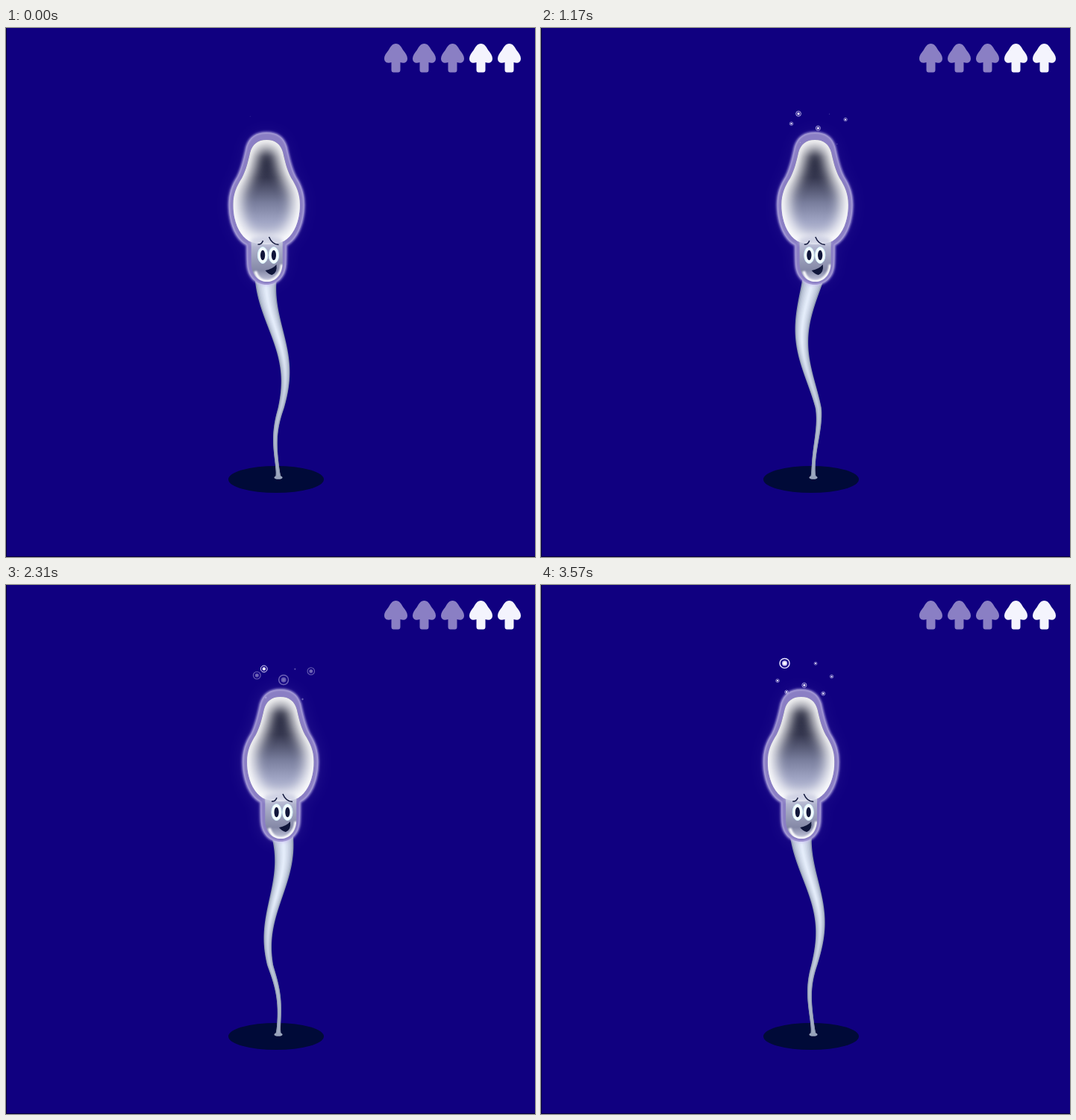
Recreate the animation shown at these times as an HTML page. Size 709 by 709 pixels, loop 3600 ms.

```html
<!DOCTYPE html>
<html>
<head>
<meta charset="utf-8">
<style>
  html, body { margin: 0; width: 100%; height: 100%; overflow: hidden; background: #100080; }
  svg { display: block; }
</style>
</head>
<body>
<svg width="709" height="709">
  <defs>
    <linearGradient id="shade" gradientUnits="userSpaceOnUse" x1="0" y1="150" x2="0" y2="290">
      <stop offset="0" stop-color="#4a4c62"/>
      <stop offset=".16" stop-color="#1f2138"/>
      <stop offset=".36" stop-color="#35374f"/>
      <stop offset=".6" stop-color="#787d9c"/>
      <stop offset=".78" stop-color="#a0a5c4"/>
      <stop offset="1" stop-color="#c8cbe0"/>
    </linearGradient>
    <linearGradient id="neckShade" gradientUnits="userSpaceOnUse" x1="0" y1="280" x2="0" y2="340">
      <stop offset="0" stop-color="#cbcee2"/>
      <stop offset=".3" stop-color="#aaadc8"/>
      <stop offset=".75" stop-color="#8488a6"/>
      <stop offset="1" stop-color="#c8cbe0"/>
    </linearGradient>
    <linearGradient id="tailShade" gradientUnits="userSpaceOnUse" x1="0" y1="420" x2="0" y2="602">
      <stop offset="0" stop-color="#74809c" stop-opacity="0"/>
      <stop offset="1" stop-color="#74809c" stop-opacity=".6"/>
    </linearGradient>
    <radialGradient id="core">
      <stop offset=".3" stop-color="#fff"/>
      <stop offset="1" stop-color="#a9a0e6"/>
    </radialGradient>
    <filter id="blur1" x="-20%" y="-20%" width="140%" height="140%"><feGaussianBlur stdDeviation=".8"/></filter>
    <filter id="blur3" x="-20%" y="-20%" width="140%" height="140%"><feGaussianBlur stdDeviation="2.5"/></filter>
    <filter id="blur8" x="-50%" y="-50%" width="200%" height="200%"><feGaussianBlur stdDeviation="8"/></filter>
    <filter id="blur10" x="-60%" y="-40%" width="220%" height="180%"><feGaussianBlur stdDeviation="10"/></filter>
    <path id="bell"/>
    <path id="neck" d="M-20.500 280V316C-20 332-10 340 0.500 340S21 332 21.500 316V280Z"/>
    <path id="halo"/>
    <clipPath id="inBell"><use href="#bell"/></clipPath>
    <clipPath id="inNeck"><use href="#neck"/></clipPath>
    <path id="mushroom" d="M0 21C5 21 7 25 10 30C13 34 15.500 37 15.500 41C15.500 46 11 48 6 46V56Q6 59.500 3 59.500H-3Q-6 59.500-6 56V46C-11 48-15.500 46-15.500 41C-15.500 37-13 34-10 30C-7 25-5 21 0 21Z"/>
  </defs>

  <path d="M.5 0V708.500H709" fill="none" stroke="#06003c"/>
  <g fill="#8a7fc4">
    <use href="#mushroom" x="522.500"/><use href="#mushroom" x="560.500"/><use href="#mushroom" x="598.500"/>
    <g fill="#f4f4fd"><use href="#mushroom" x="636.500"/><use href="#mushroom" x="674.500"/></g>
  </g>

  <ellipse cx="362" cy="605" rx="64" ry="18" fill="#000a38"/>
  <g id="tail"></g>
  <ellipse cx="365" cy="602.500" rx="5.500" ry="2.300" fill="#98a3bb"/>

  <g id="head">
    <use id="glow" href="#halo" fill="#e4dcff" stroke="#e4dcff" stroke-width="6" filter="url(#blur10)"/>
    <use href="#halo" fill="#b5a8ee" opacity=".6" filter="url(#blur3)"/>
    <use href="#halo" fill="#8a7ec4"/>
    <use id="ring" href="#halo" fill="none" stroke="#d6cff5" stroke-width="2.200" filter="url(#blur1)"/>
    <use href="#neck" fill="url(#neckShade)"/>
    <g clip-path="url(#inNeck)">
      <path d="M-15 326C-12 336-6 339.500 0.500 339.500S19 334 20.500 317" fill="none" stroke="#fff" stroke-width="3.500" filter="url(#blur1)"/>
    </g>
    <use href="#bell" fill="url(#shade)"/>
    <g clip-path="url(#inBell)" fill="none" stroke="#fff">
      <use href="#bell" stroke-width="23" opacity=".92" filter="url(#blur8)"/>
      <use href="#bell" stroke-width="5" opacity=".65" filter="url(#blur3)"/>
    </g>
    <path d="M-21 290V283Q0 274 21 283V290Z" fill="#c8cbe0" opacity=".8" filter="url(#blur3)"/>
  </g>

  <g id="face" fill="#10163a">
    <g fill="#f4fdff" stroke="#d3f0f8">
      <ellipse cx="-7.400" cy="304.500" rx="6.700" ry="11"/>
      <ellipse cx="7.400" cy="304.500" rx="6.700" ry="11"/>
    </g>
    <ellipse cx="-7.400" cy="304.500" rx="3.100" ry="6.700"/>
    <ellipse cx="7.400" cy="304.500" rx="3.100" ry="6.700"/>
    <path d="M-14 290Q-9 290.500-7 285M1 280Q5 290 14 290.500" fill="none" stroke="#10163a" stroke-width="1.500"/>
    <path d="M-4 325Q6 323 11 317Q12.500 328 5 331Q0 330-4 325Z"/>
  </g>
  <g id="bubbles"></g>
</svg>

<script>
const $ = id => document.getElementById(id);
const LOOP = 3600, SWAY = 900, TOP = 332, BASE = 602;

function add(parent, tag, attrs) {
  const el = document.createElementNS('http://www.w3.org/2000/svg', tag);
  for (const k in attrs) el.setAttribute(k, attrs[k]);
  return parent.appendChild(el);
}

// Right half as cubic points; the left half mirrors it.
function mirrored(half) {
  const back = half.slice(0, -1).reverse().map(([x, y]) => [-x, y]);
  const [start, ...rest] = half.concat(back);
  return `M${start}C${rest.join(' ')}Z`;
}
$('bell').setAttribute('d', mirrored([
  [0, 150], [12, 150], [19, 156], [22, 167], [25, 180], [27, 189], [33, 201],
  [40, 212], [44.7, 222], [44.7, 237], [44.7, 262], [34, 282], [20, 287], [13, 289], [6, 290], [0, 290]]));
$('halo').setAttribute('d', mirrored([
  [0, 140], [14, 140], [23, 146], [27, 159], [30, 173], [33, 187], [39, 199],
  [47, 211], [50.5, 222], [50.5, 237], [50.5, 262], [41, 284], [26.5, 291],
  [26.5, 300], [26.5, 308], [26, 317], [25, 334], [14, 344], [0, 344]]));

const LAYERS = 9;
const layers = Array.from({ length: LAYERS }, (_, i) => {
  const k = Math.sqrt(i / (LAYERS - 1));
  const mix = (a, b) => Math.round(a + (b - a) * k);
  return add($('tail'), 'path', { fill: `rgb(${mix(140, 228)},${mix(151, 236)},${mix(174, 250)})` });
});
const tailTint = add($('tail'), 'path', { fill: 'url(#tailShade)' });

// dx from the head, starting y, rise, lifetime, radius over life
const late = size => u => size * Math.max(0, u - 0.1);
const small = size => u => size * Math.max(0, u - 0.05);
const bubbles = [
  [-22, 118.7, 22.5, 540, u => 9.2 * Math.sqrt(u)],
  [19.5, 119, 22.5, 540, small(4)],
  [-19.5, 157.2, 22.5, 540, small(4.7)],
  [29.7, 159.3, 22.5, 540, small(5)],
  [-31.5, 136.6, 19, 480, late(7.6)],
  [4.3, 142.6, 19, 480, late(10)],
  [41, 131, 19, 480, late(7.4)],
].map(([dx, y, rise, life, radius]) => {
  const g = add($('bubbles'), 'g', {});
  const ring = add(g, 'circle', { fill: 'none', stroke: '#e6e2ff' });
  const dot = add(g, 'circle', { fill: 'url(#core)' });
  return { dx, y, rise, life, radius, g, ring, dot };
});

const wave = (t, peak, period = SWAY) => Math.cos(2 * Math.PI * (t - peak) / period);

// The wave travels down the tail and dies out at its foot.
function tailCentre(y, t) {
  const reach = 11.9 * Math.min(1, (BASE - y) / 92) ** 1.25;
  return 360 + 5 * (y - TOP) / (BASE - TOP) + reach * wave(t, 630 + 3.6 * (y - 390));
}
const tailWidth = y =>
  4.6 + 24.6 * ((BASE - y) / 267) ** 1.85 + 3 * Math.exp((y - BASE) / 5);

function tailPath(t, scale) {
  const left = [], right = [];
  for (let y = TOP; y <= BASE; y += 3) {
    const c = tailCentre(y, t), w = tailWidth(y) / 2 * scale;
    left.push(`${(c - w).toFixed(2)} ${y}`);
    right.unshift(`${(c + w).toFixed(2)} ${y}`);
  }
  return 'M' + left.concat(right).join('L') + 'Z';
}

function draw(now) {
  const t = now % LOOP;
  const headX = 359.8 + 11.4 * wave(t, 397);
  const faceX = headX + 1.8 + 2.1 * wave(t, 710);
  const pulse = (1 - wave(t, 0, 1200)) / 2;

  $('head').setAttribute('transform', `translate(${headX} 0)`);
  $('face').setAttribute('transform', `translate(${faceX} 0)`);
  $('glow').setAttribute('opacity', 0.05 + 0.6 * pulse);
  $('ring').setAttribute('opacity', 0.55 + 0.35 * pulse);

  layers.forEach((p, i) => p.setAttribute('d', tailPath(t, 1 - i / LAYERS)));
  tailTint.setAttribute('d', tailPath(t, 1));

  for (const b of bubbles) {
    const u = t % b.life / b.life, r = b.radius(u);
    b.g.setAttribute('transform', `translate(${headX + b.dx} ${b.y - b.rise * u})`);
    b.g.setAttribute('opacity', Math.max(0, Math.min(1, (0.9 - u) / 0.2)));
    b.ring.setAttribute('r', r * 0.9);
    b.ring.setAttribute('stroke-width', r * 0.2);
    b.dot.setAttribute('r', r * 0.5);
  }
  requestAnimationFrame(() => draw(performance.now() - start));
}
const start = performance.now();
draw(0);
</script>
</body>
</html>
```
